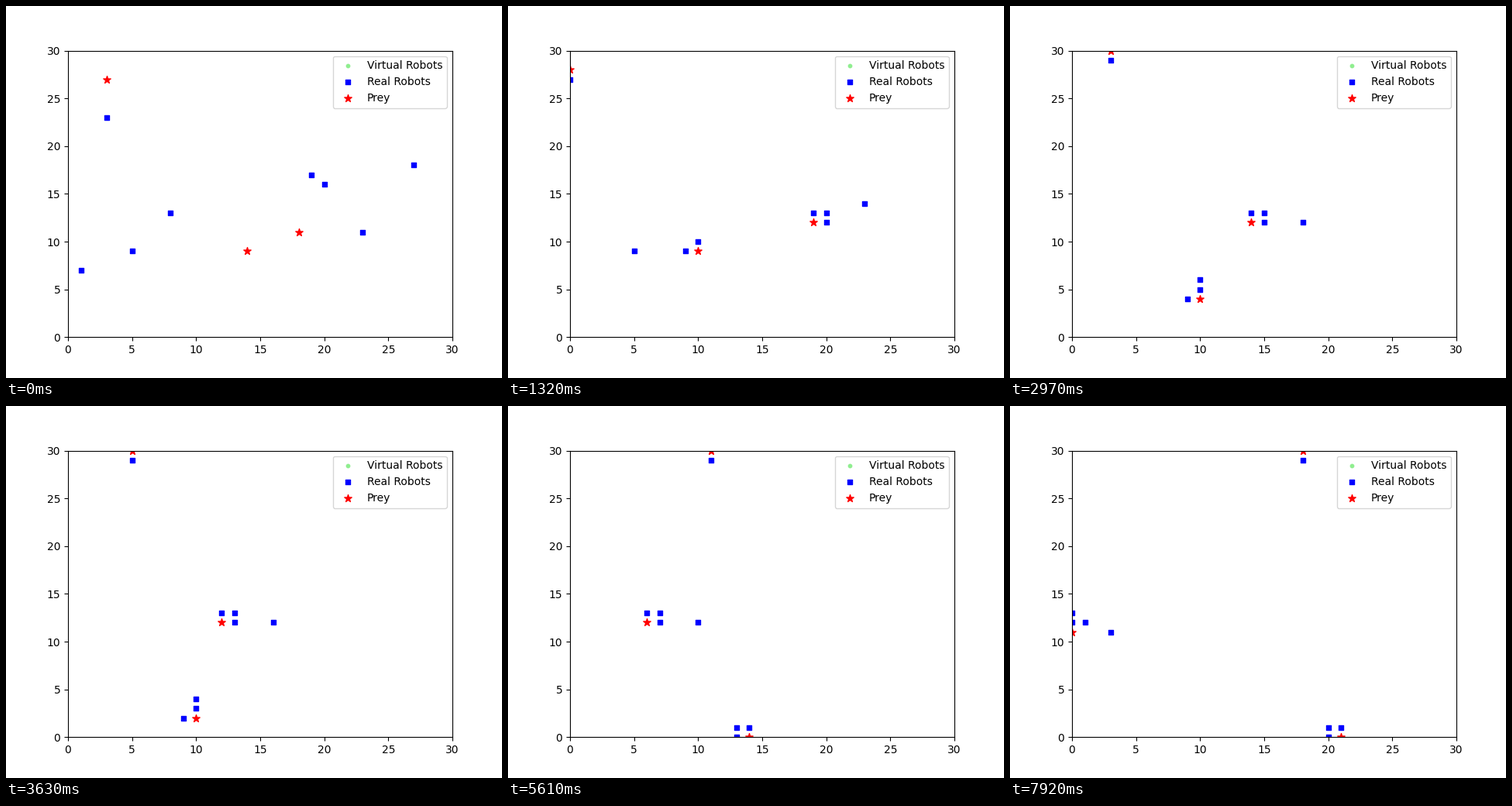
A matplotlib script that plays this animation: 640 by 480 pixels, repeating every 8 s.

```python
import numpy as np
import matplotlib.pyplot as plt
from matplotlib.animation import FuncAnimation

LOOP, TICK, STEP = 8000, 20, 330  # ms
SIZE = 30
EAST, NORTH, WEST, SOUTH = TURNS = [(1, 0), (0, 1), (-1, 0), (0, -1)]

# Starting cells, in the order in which they move.
ROBOTS = [(3, 23), (5, 9), (1, 7), (8, 13), (23, 11), (20, 16), (19, 17), (27, 18)]
PREY = [(3, 27), (18, 11), (14, 9)]
HEADINGS = [WEST, EAST, WEST]


def add(cell, move):
    return cell[0] + move[0], cell[1] + move[1]


def dist2(a, b):
    return (a[0] - b[0]) ** 2 + (a[1] - b[1]) ** 2


def flee(cell, heading, taken):
    """Run straight on; when blocked, turn aside into a free cell."""
    sideways = [m for m in TURNS if m[0] * heading[0] + m[1] * heading[1] == 0]
    for move in [heading] + sideways:
        new = add(cell, move)
        if new not in taken and 0 <= min(new) and max(new) <= SIZE:
            return new, move
    return cell, heading


def chase(cell, targets, taken):
    """Step towards the nearest prey: diagonally, else along one axis."""
    goal = min(targets, key=lambda p: dist2(cell, p))
    dx, dy = np.sign(np.subtract(goal, cell)).tolist()
    straight = [add(cell, m) for m in TURNS if m in ((dx, 0), (0, dy))]
    straight.sort(key=lambda c: dist2(c, goal))
    for new in [add(cell, (dx, dy))] + straight:
        if new not in taken:
            return new
    return cell


def simulate(steps):
    robots, prey, headings = ROBOTS[:], PREY[:], HEADINGS[:]
    states = [(robots[:], prey[:])]
    for _ in range(steps):
        for i, cell in enumerate(prey):
            prey[i], headings[i] = flee(cell, headings[i], robots + prey)
        for i, cell in enumerate(robots):
            robots[i] = chase(cell, prey, robots + prey)
        states.append((robots[:], prey[:]))
    return states


states = simulate(LOOP // STEP)

fig, ax = plt.subplots(figsize=(6.4, 4.8), dpi=100)
ax.set_xlim(0, SIZE)
ax.set_ylim(0, SIZE)
ax.scatter([], [], s=10, marker="o", color="lightgreen", label="Virtual Robots")
robot_dots = ax.scatter([], [], s=20, marker="s", color="blue", label="Real Robots")
prey_dots = ax.scatter([], [], s=50, marker="*", color="red", label="Prey")
ax.legend(loc="upper right")


def update(i):
    # Sampled mid-tick, so a step change never comes late.
    robots, prey = states[(i * TICK + TICK // 2) // STEP]
    robot_dots.set_offsets(robots)
    prey_dots.set_offsets(prey)
    return robot_dots, prey_dots


anim = FuncAnimation(fig, update, frames=LOOP // TICK, interval=TICK,
                     repeat=True, repeat_delay=0)
plt.show()
```
